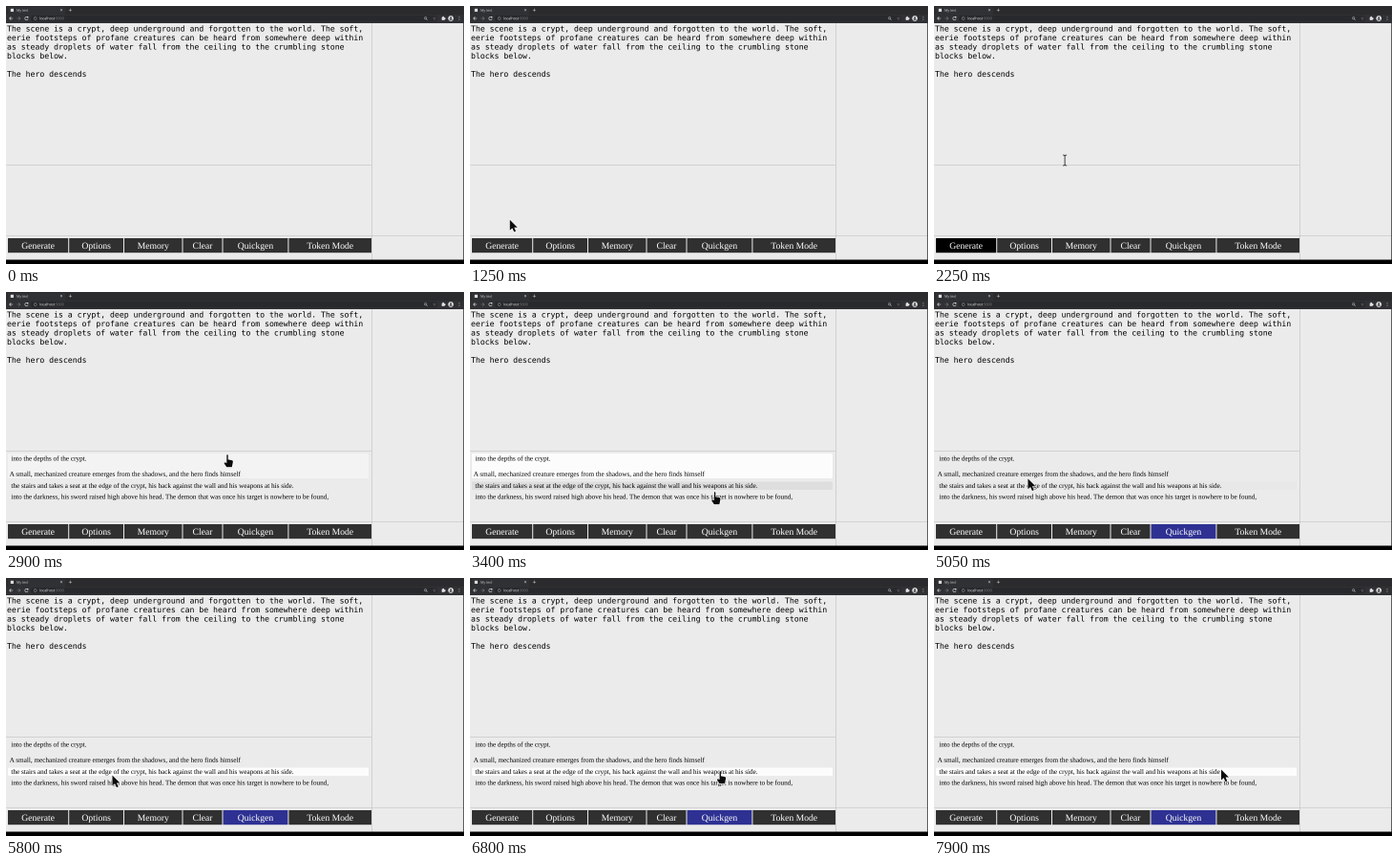
Write an HTML page with a canvas that moves like this. It is 480 by 270 pixels and loops after 8000 ms.

```html
<!DOCTYPE html>
<html lang="en">
<head>
<meta charset="utf-8">
<title>Story writer</title>
<style>
  html, body { margin: 0; width: 100%; height: 100%; overflow: hidden; background: #ebebeb; }
  canvas { display: block; width: 480px; height: 270px; }
</style>
</head>
<body>
<canvas id="stage" width="480" height="270"></canvas>
<script>
// Draw a full-size screen, then scale it down for soft subpixel text.
const SCALE = 4;
const stage = document.getElementById('stage').getContext('2d');
const screenCanvas = document.createElement('canvas');
screenCanvas.width = 480 * SCALE;
screenCanvas.height = 270 * SCALE;
const ctx = screenCanvas.getContext('2d');
ctx.scale(SCALE, SCALE);
ctx.textRendering = 'geometricPrecision';
stage.imageSmoothingQuality = 'high';

const LOOP = 8000;
const SERIF = '"Liberation Serif", serif';
const MONO = '"DejaVu Sans Mono", monospace';
const SANS = '"Open Sans", sans-serif';

const STORY = [
  'The scene is a crypt, deep underground and forgotten to the world. The soft,',
  'eerie footsteps of profane creatures can be heard from somewhere deep within',
  'as steady droplets of water fall from the ceiling to the crumbling stone',
  'blocks below.',
  '',
  'The hero descends'
];

const OPTIONS = [
  [5.4, 176.5, 'into the depths of the crypt.'],
  [3.7, 192.8, 'A small, mechanized creature emerges from the shadows, and the hero finds himself'],
  [5.4, 204.9, 'the stairs and takes a seat at the edge of the crypt, his back against the wall and his weapons at his side.'],
  [5.4, 216.6, 'into the darkness, his sword raised high above his head. The demon that was once his target is nowhere to be found,']
];

const HIT_BANDS = [[169, 195], [198, 206], [208, 219]];

const BUTTONS = [
  ['Generate', 2, 65.2], ['Options', 66.2, 123], ['Memory', 124, 184.5],
  ['Clear', 185.5, 226.5], ['Quickgen', 227.5, 295.4], ['Token Mode', 296.4, 383]
];

// Pointer path: time, x, y of the hotspot
const PATH = [
  [500, 136, 150], [900, 92, 188], [1300, 37, 228],
  [1600, 34, 246], [1900, 34, 246],
  [2250, 136.8, 161.7], [2400, 190, 143], [2550, 254, 158], [2700, 232, 170],
  [3300, 232, 170], [3400, 256.5, 208.7], [3600, 260, 255], [3750, 258, 250], [3900, 258, 250],
  [4350, 167.2, 149.9], [4450, 130, 145], [4700, 63, 176],
  [4750, 62, 176], [5200, 111, 202], [5350, 111, 202],
  [5560, 23, 205], [5800, 111, 206.5], [6150, 288, 200], [6300, 288, 200],
  [6550, 147, 230], [6800, 262, 202], [7100, 294, 201],
  [7400, 311, 201], [7650, 278, 202], [7900, 301, 200.5]
];

const clamp = v => Math.max(0, Math.min(1, v));
const ramp = (t, from, to) => clamp((t - from) / (to - from));

function slope(i, axis) {
  if (i <= 0 || i >= PATH.length - 1) return 0;
  const [a, b, c] = [PATH[i - 1], PATH[i], PATH[i + 1]];
  const before = b[axis] - a[axis], after = c[axis] - b[axis];
  return before * after <= 0 ? 0 : (c[axis] - a[axis]) / (c[0] - a[0]);
}

function pathAt(t, axis) {
  const next = PATH.findIndex(p => p[0] > t);
  if (next < 0) return PATH[PATH.length - 1][axis];
  const i = next - 1, a = PATH[i], b = PATH[next];
  const span = b[0] - a[0], u = (t - a[0]) / span, v = 1 - u;
  return a[axis] * (1 + 2 * u) * v * v + b[axis] * u * u * (3 - 2 * u)
    + span * u * v * (slope(i, axis) * v - slope(next, axis) * u);
}

function box(x, y, w, h, color) {
  ctx.fillStyle = color;
  ctx.fillRect(x, y, w, h);
}

function text(str, x, y, size, family, color, align = 'left') {
  ctx.font = `${size}px ${family}`;
  ctx.textAlign = align;
  ctx.fillStyle = color;
  ctx.fillText(str, x, y);
}

function line(points, color, width) {
  ctx.beginPath();
  points.forEach(([x, y]) => ctx.lineTo(x, y));
  ctx.strokeStyle = color;
  ctx.lineWidth = width;
  ctx.stroke();
}

function disc(x, y, r, color, width) {
  ctx.beginPath();
  ctx.arc(x, y, r, 0, Math.PI * 2);
  ctx.fillStyle = ctx.strokeStyle = color;
  if (width) { ctx.lineWidth = width; ctx.stroke(); } else ctx.fill();
}

function row(y, h, color, alpha) {
  if (alpha <= 0) return;
  ctx.globalAlpha = alpha;
  ctx.beginPath();
  ctx.roundRect(2, y, 378, h, 1);
  ctx.fillStyle = color;
  ctx.fill();
  ctx.globalAlpha = 1;
}

function drawBrowser() {
  box(0, 0, 480, 9, '#2b2b2d');
  box(2, 1, 60, 8, '#303134');
  box(0, 9, 480, 9, '#303134');
  box(4.8, 2.8, 3.2, 3.2, '#dcdcdc');
  text('My text', 11, 5.7, 3.6, SANS, '#d8d8d8');
  line([[57, 3.2], [59, 5.2]], '#bbb', 0.5);
  line([[59, 3.2], [57, 5.2]], '#bbb', 0.5);
  line([[65.8, 4.2], [69, 4.2]], '#ccc', 0.5);
  line([[67.4, 2.6], [67.4, 5.8]], '#ccc', 0.5);

  line([[7.2, 13], [3.6, 13]], '#ddd', 0.6);
  line([[5.3, 11.3], [3.6, 13], [5.3, 14.7]], '#ddd', 0.6);
  line([[11.5, 13], [15, 13]], '#777', 0.6);
  line([[13.3, 11.3], [15, 13], [13.3, 14.7]], '#777', 0.6);
  ctx.beginPath();
  ctx.arc(21.5, 13, 1.7, 0.3, 5.4);
  ctx.strokeStyle = '#ddd';
  ctx.lineWidth = 0.6;
  ctx.stroke();
  box(22, 11, 1.4, 1.4, '#ddd');

  ctx.beginPath();
  ctx.roundRect(26, 10, 426, 6.5, 3.2);
  ctx.fillStyle = '#28292c';
  ctx.fill();
  disc(30.7, 13, 1.4, '#bbb', 0.4);
  text('localhost', 35.2, 14.3, 3.8, SANS, '#eee');
  const hostWidth = ctx.measureText('localhost').width;
  text(':5000', 35.2 + hostWidth, 14.3, 3.8, SANS, '#888');

  disc(439.7, 12.7, 1.2, '#ccc', 0.5);
  line([[440.6, 13.6], [441.7, 14.7]], '#ccc', 0.5);
  text('☆', 449, 14.5, 4.5, '"DejaVu Sans", sans-serif', '#ccc', 'center');
  box(456.7, 11.8, 3, 3, '#e2e2e2');
  disc(458.2, 11.6, 0.8, '#e2e2e2');
  disc(459.9, 13.2, 0.8, '#e2e2e2');
  disc(466.2, 13, 2.8, '#e8e8e8');
  disc(466.2, 12.2, 0.9, '#303134');
  box(464.8, 13.4, 2.8, 1.3, '#303134');
  for (let i = -1; i <= 1; i++) disc(475, 13 + i * 1.5, 0.4, '#ddd');
}

function drawPage(t) {
  box(0, 18, 480, 248, '#ebebeb');
  box(0, 166, 383, 0.5, '#b8b8b8');
  box(0, 240.25, 480, 0.5, '#bcbcbc');
  box(383.25, 18, 0.5, 248, '#b8b8b8');
  box(479.25, 18, 0.75, 248, '#303030');
  STORY.forEach((s, i) => text(s, 1, 26.5 + i * 9.5, 8.16, MONO, '#000'));
  if (t >= 500 && t < 1000) box(85, 66, 0.6, 10.5, '#000');

  row(169, 26, '#fcfcfc', ramp(t, 2750, 3050) * (1 - ramp(t, 3400, 3650)));
  row(198.5, 8.5, '#dedede', ramp(t, 3320, 3400));
  row(198.5, 8.5, '#fcfcfc', ramp(t, 4950, 5250));
  if (t >= 2750) OPTIONS.forEach(([x, y, s]) => text(s, x, y, 7.2, SERIF, '#000'));

  for (const [label, left, right] of BUTTONS) {
    let color = '#303030';
    if (label === 'Generate' && t >= 1750 && t < 2750) color = '#000';
    if (label === 'Quickgen' && t >= 3900) color = '#2e3192';
    box(left, 243, right - left, 15.2, color);
    text(label, (left + right) / 2, 254.1, 9.65, SERIF, '#fff', 'center');
  }
  box(0, 265.5, 480, 4.5, '#000');
}

const ARROW = new Path2D('M0 0V11L2.6 8.7L4.5 12.7L6.3 11.9L4.5 8H8Z');
const HAND = new Path2D('M-.7 .7Q0-.4 .7 .7V5.3L5 6.2Q6 6.6 5.8 8L4.8 13.2H-.8L-3.4 9.3Q-3.2 7.8-.7 9Z');
const BEAM = new Path2D('M-2-5.5Q0-5.5 0-4.5Q0-5.5 2-5.5M0-4.5V4.5M-2 5.5Q0 5.5 0 4.5Q0 5.5 2 5.5');

function drawPointer(t) {
  if (t < 500) return;
  const x = pathAt(t, 1), y = pathAt(t, 2);
  const onButton = y > 243;
  const onOption = t >= 2750 && x < 300 && HIT_BANDS.some(([top, bottom]) => y >= top && y < bottom);
  ctx.save();
  ctx.translate(x, y);
  ctx.lineJoin = 'round';
  if (y < 166) {
    ctx.strokeStyle = '#fff';
    ctx.lineWidth = 1.8;
    ctx.stroke(BEAM);
    ctx.strokeStyle = '#181818';
    ctx.lineWidth = 0.9;
    ctx.stroke(BEAM);
  } else {
    const shape = onButton || onOption ? HAND : ARROW;
    ctx.strokeStyle = '#fff';
    ctx.lineWidth = 1.2;
    ctx.stroke(shape);
    ctx.fillStyle = '#0c0c0c';
    ctx.fill(shape);
  }
  ctx.restore();
}

function render(now) {
  const t = now % LOOP;
  drawBrowser();
  drawPage(t);
  drawPointer(t);
  stage.drawImage(screenCanvas, 0, 0, 480, 270);
}

const start = performance.now();
function tick() {
  render(performance.now() - start);
  requestAnimationFrame(tick);
}
tick();
</script>
</body>
</html>
```
